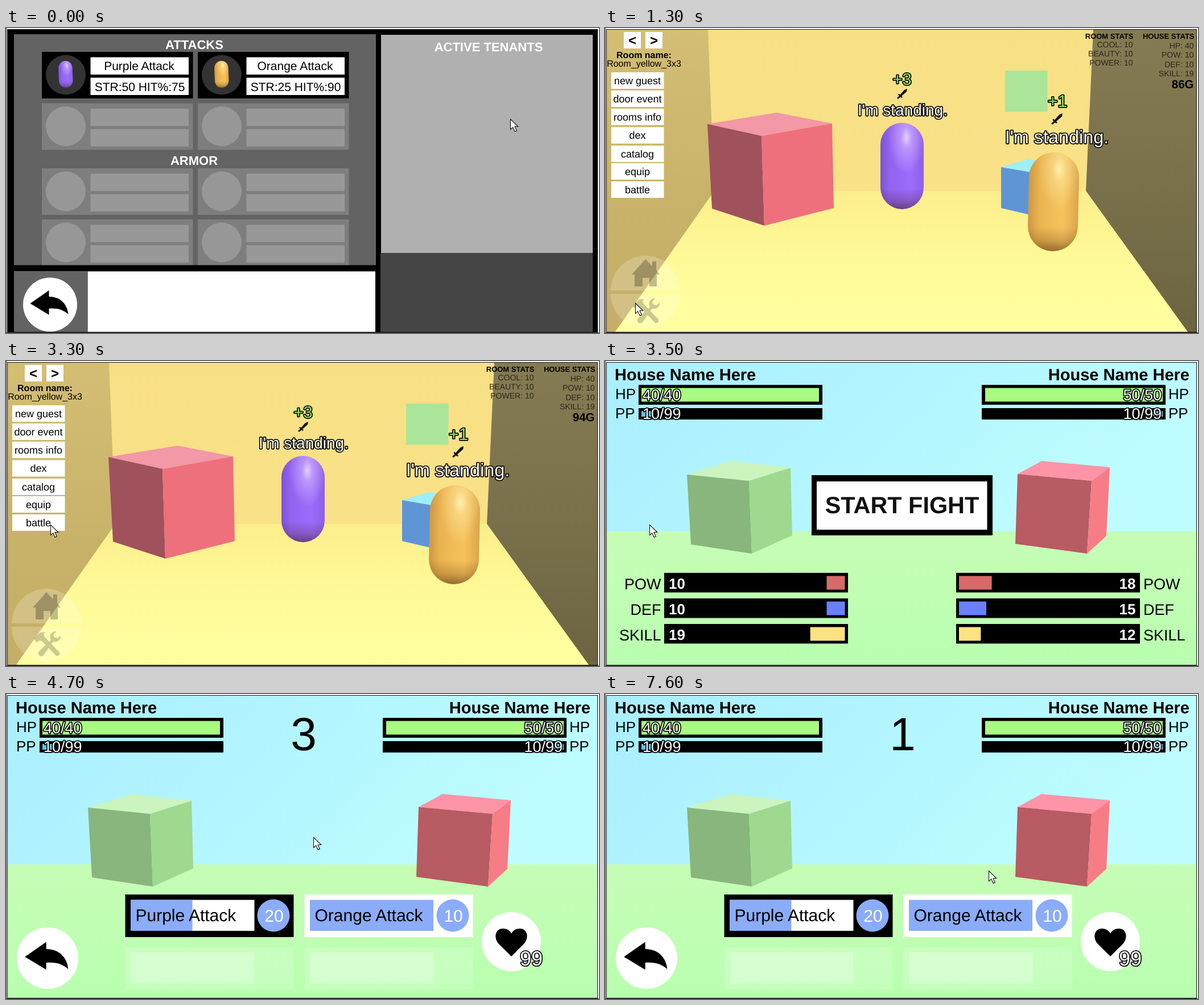
An HTML page that plays this animation: 1042 px wide and 537 px high, repeating every 8000 ms.

```html
<!DOCTYPE html>
<html lang="en">
<head>
<meta charset="utf-8">
<title>Room, equip and battle</title>
<style>
  html, body { margin: 0; width: 100%; height: 100%; overflow: hidden; background: #fff; }
  svg { display: block; width: 100vw; height: 100vh; }
  text { font-family: "Liberation Sans", Arial, sans-serif; text-rendering: geometricPrecision; }
  .b { font-weight: bold; }
  .o { fill: #fff; stroke: #000; stroke-width: 3.4; stroke-linejoin: round; paint-order: stroke; }
  .plus { fill: #8be565; }
  .m { text-anchor: middle; }
  .e { text-anchor: end; }
</style>
</head>
<body>
<svg id="stage" viewBox="0 0 1042 537"></svg>
<script>
const LOOP = 8000;
const BLUE = '#8aacf9';

// Shapes are given by their edges: left, top, right, bottom.
const rect = (l, t, r, b, fill, extra = '') =>
  `<rect x="${l}" y="${t}" width="${r - l}" height="${b - t}" fill="${fill}" ${extra}/>`;
const circ = (x, y, r, fill, extra = '') => `<circle cx="${x}" cy="${y}" r="${r}" fill="${fill}" ${extra}/>`;
const poly = (points, fill) => `<polygon points="${points}" fill="${fill}"/>`;
const path = (d, fill, extra = '') => `<path d="${d}" fill="${fill}" ${extra}/>`;
const text = (x, y, size, str, cls = '', fill = '') =>
  `<text x="${x}" y="${y}" font-size="${size}" class="${cls}" ${fill && `fill="${fill}"`}>${str}</text>`;
const group = (id, body, extra = '') => `<g id="${id}" ${extra}>${body}</g>`;
const gradient = (id, dir, stops) => {
  const [x2, y2] = dir;
  return `<linearGradient id="${id}" x2="${x2}" y2="${y2}">` +
    stops.map(([at, c, a = 1]) => `<stop offset="${at}" stop-color="${c}" stop-opacity="${a}"/>`).join('') +
    '</linearGradient>';
};
const glow = (id, color) =>
  `<radialGradient id="${id}" cx=".6" cy=".17" r=".42"><stop offset="0" stop-color="${color}"/>` +
  `<stop offset=".3" stop-color="${color}" stop-opacity=".45"/><stop offset="1" stop-color="${color}" stop-opacity="0"/></radialGradient>`;

const defs = '<defs>' +
  gradient('purple', [1, 0], [[0, '#7c52d8'], [.2, '#9263ee'], [.7, '#9c6cfb'], [1, '#8d60e6']]) +
  gradient('orange', [1, 0], [[0, '#cf9844'], [.22, '#eab350'], [.7, '#f7c25c'], [1, '#dca54c']]) +
  gradient('shade', [0, 1], [[.76, '#301500', 0], [.9, '#301500', .2], [1, '#301500', .48]]) +
  glow('purpleGlow', '#e6ccff') + glow('orangeGlow', '#fff0ae') +
  gradient('back', [0, 1], [[0, '#f7df84'], [1, '#fbe48a']]) +
  gradient('leftWall', [0, 1], [[0, '#d3be74'], [.6, '#c8b269'], [1, '#c5af66']]) +
  gradient('rightWall', [0, 1], [[0, '#857b53'], [.5, '#7a714c'], [1, '#6c6441']]) +
  gradient('floor', [0, 1], [[0, '#fcee8c'], [.5, '#fffa98'], [1, '#ffffa0']]) +
  gradient('sky', [1, .3], [[0, '#a9eeff'], [1, '#bdfdff']]) +
  gradient('ground', [0, 1], [[0, '#c6fdb6'], [1, '#b9ffb0']]) +
  '</defs>';

const capsule = (name, cx, cy, w, h, tilt) => {
  const layer = fill => rect(cx - w / 2, cy - h / 2, cx + w / 2, cy + h / 2, `url(#${fill})`, `rx="${w / 2}"`);
  return `<g transform="rotate(${tilt} ${cx} ${cy})">${[name, 'shade', name + 'Glow'].map(layer).join('')}</g>`;
};

const backButton = (x, y, r) =>
  `<g transform="translate(${x} ${y}) scale(${r / 47.5})">` + circ(0, 0, 47.5, '#fff') +
  path('M-35-2L-2-25V-14C17-14 30-2 32 17C23 9 13 6-2 7V18Z', '#000') + '</g>';

// Equip screen
function slot(x, y, item) {
  const box = t => rect(x + 85.5, y + t, x + 258, y + t + 30.5, item ? '#fff' : '#989898');
  let s = rect(x, y, x + 265.5, y + 82, item ? '#000' : '#7e7e7e') +
    circ(x + 42, y + 40.5, 35, item ? '#333' : '#979797') + box(9.5) + box(45.5);
  if (item) {
    s += text(x + 171, y + 32, 21, item.name, 'm') + text(x + 172, y + 68.5, 21, item.stats, 'm') +
      capsule(item.color, x + 41.8, y + 39.5, 24.5, 47, -2);
  }
  return s;
}

function equipScreen() {
  const items = [
    { name: 'Purple Attack', stats: 'STR:50 HIT%:75', color: 'purple' },
    { name: 'Orange Attack', stats: 'STR:25 HIT%:90', color: 'orange' },
  ];
  const rows = [42, 132.5, 247, 337].map((y, i) =>
    [63, 337].map((x, j) => slot(x, y, i === 0 && items[j])).join('')).join('');
  return rect(2, 2, 1039, 535.5, '#000') + rect(14, 11, 650, 418, '#636363') + rows +
    rect(14, 417.5, 650, 428, '#000') +
    text(331, 36.5, 22, 'ATTACKS', 'b m', '#fff') + text(330.5, 241, 22, 'ARMOR', 'b m', '#fff') +
    rect(14, 428, 143, 535, '#636363') + rect(143.5, 428.5, 649, 535, '#fff') + backButton(77.5, 487, 47.5) +
    rect(659, 12, 1031, 396, '#b0b0b0') + rect(658, 396, 1031, 535, '#454545') +
    text(848, 41, 22, 'ACTIVE TENANTS', 'b m', '#fff');
}

// Room screen
const sword = (x, y, k) => `<g transform="translate(${x} ${y}) scale(${k})">` +
  path('M18 0L17 5 8 13 10 15 8 16 6 14.5 2 18 0 16 4 12.5 2 10.5 3.5 9 5.5 10.5 13 2Z', '#111') + '</g>';

function roomScreen() {
  const menu = [['new guest', 78], ['door event', 110], ['rooms info', 142], ['dex', 174.5],
    ['catalog', 207], ['equip', 238], ['battle', 270]];
  const lines = (x, y, step, list) =>
    list.map((s, i) => text(x, y + i * step, 14, s, 'e', '#2c2818')).join('');
  const house = 'M71 407L83 419V411H90V426L96 434H91V455H78V440H66V455H52V434H47Z';
  const wrench = 'M80 479a10 10 0 0 1 8-3l-5 6 2 5 6 1 5-5a10 10 0 0 1-13 11L66 518a5 5 0 0 1-8-7L79 491a10 10 0 0 1 1-12Z';
  const hammer = 'M49 489L60 478 69 477 66 481 69 487 93 512A4 4 0 0 1 87 518L63 493 58 492 54 496Z';
  return rect(2, 2, 1039, 535, 'url(#back)') +
    poly('3,3 181,3 192,288 18,535 3,535', 'url(#leftWall)') +
    poly('858,3 1039,3 1039,535 1023,535 845,287', 'url(#rightWall)') +
    poly('192,287 845,287 1024,535 18,535', 'url(#floor)') +
    poly('180,169 302,149 399,168 275,190', '#f298a6') +
    poly('180,169 275,190 280,348 188,318', '#9f525c') +
    poly('275,190 399,168 402,317 280,348', '#ee707c') +
    rect(703, 75, 777.5, 147.5, '#abe59a') +
    poly('696,245 742,231 800,238 760,256', '#9eeff7') +
    poly('696,245 760,256 760,332 696,317', '#5f95d4') +
    capsule('purple', 522, 243, 76, 152, 0) + capsule('orange', 788, 306, 88, 174, 1.3) +
    sword(513, 107, 1) + sword(784, 150, 1.12) +
    text(523, 153.5, 28, "I'm standing.", 'o m') + text(794, 203, 32.4, "I'm standing.", 'o m') +
    group('gains', text(522, 100, 29, '+3', 'o plus m') + text(795, 139, 30, '+1', 'o plus m')) +
    rect(33, 7, 63, 36, '#fff') + rect(71, 7, 101, 36, '#fff') +
    text(48, 29.5, 24, '&lt;', 'b m') + text(86, 29.5, 24, '&gt;', 'b m') +
    text(68.5, 53, 16, 'Room name:', 'b m') + text(68.5, 68, 16, 'Room_yellow_3x3', 'm') +
    menu.map(([s, y]) => rect(11, y, 103.5, y + 29, '#fff') + text(57, y + 20.5, 18, s, 'm')).join('') +
    path('M10 462A61 61 0 0 1 132 462Z', '#fff', 'opacity=".2"') +
    path('M10 468A61 61 0 0 0 132 468Z', '#fff', 'opacity=".2"') +
    path(house, '#000', 'opacity=".25"') +
    `<g opacity=".2">${path(wrench, '#000')}${path(hammer, '#000')}</g>` +
    text(928.5, 18.5, 13, 'ROOM STATS', 'b e') + text(1035.5, 18.5, 13, 'HOUSE STATS', 'b e') +
    lines(927.5, 33.5, 16.3, ['COOL: 10', 'BEAUTY: 10', 'POWER: 10']) +
    lines(1034.5, 36, 16.3, ['HP: 40', 'POW: 10', 'DEF: 10', 'SKILL: 19']) +
    '<text id="gold" x="1034.5" y="106" font-size="20.5" class="b e"></text>';
}

// Battle screen; side 0 is the left fighter, side 1 the right one.
function fighterHud(side, hp) {
  const mirror = (l, t, r, b, fill) => side ? rect(1044 - r, t, 1044 - l, b, fill) : rect(l, t, r, b, fill);
  const end = side ? 'e' : '';
  const tag = side ? 990 : 18;
  const num = side ? 978 : 66;
  return text(side ? 1027 : 17, 34, 29, 'House Name Here', 'b ' + end) +
    text(tag, 67, 26, 'HP') + text(tag, 101, 26, 'PP') +
    mirror(59, 42, 382, 77, '#000') + mirror(64, 47.5, 376, 71.5, '#a8fb80') +
    mirror(59, 83, 382, 103, '#000') + mirror(64, 88, 81, 98, '#62c3ee') +
    text(num, 69, 27, `${hp}/${hp}`, 'o ' + end) + text(num, 101.5, 27, '10/99', 'o ' + end);
}

function statBar(side, row, name, value, color) {
  const y = 373 + row * 45;
  const w = value * 3.2;
  const left = side ? 617 : 104;
  const fillLeft = side ? 622 : 421.5 - w;
  return text(side ? 946 : 98.5, y + 28.5, 27, name, side ? '' : 'e') +
    rect(left, y, left + 323, y + 34.5, '#000') + rect(fillLeft, y + 5.5, fillLeft + w, y + 29.5, color) +
    text(side ? 932.5 : 112, y + 27.5, 26, value, side ? 'b e' : 'b', '#fff');
}

function attackButton(x, name, cost, frame, charge) {
  return rect(x, 353, x + 296, 428, frame) + rect(x + 9.5, 362.5, x + 227, 417, '#fff') +
    rect(x + 9.5, 362.5, x + 9.5 + 217 * charge, 417, BLUE) + text(x + 18, 400, 30, name) +
    circ(x + 260.5, 390, 28.5, BLUE) + text(x + 261.5, 401, 30, cost, 'm', '#fff') +
    rect(x, 446, x + 296, 520, '#fff', 'opacity=".15"') + rect(x + 9.5, 455, x + 227, 510, '#fff', 'opacity=".25"');
}

function battleScreen() {
  const stats = [['POW', 10, 18, '#d66a68'], ['DEF', 10, 15, '#6b80ff'], ['SKILL', 19, 12, '#fde281']];
  const setup = stats.map(([name, a, b, color], i) =>
    statBar(0, i, name, a, color) + statBar(1, i, name, b, color)).join('') +
    rect(363, 201, 681, 307, '#000') + rect(372, 212, 671.5, 297, '#fff') +
    text(522, 268, 41.4, 'START FIGHT', 'b m', '#111');
  const fight = '<text id="count" x="523" y="99" font-size="82" class="m"></text>' +
    attackButton(209.5, 'Purple Attack', 20, '#000', .5) + attackButton(524.5, 'Orange Attack', 10, '#fff', 1) +
    backButton(73, 465, 54) + circ(888, 436, 52, '#fff') +
    path('M888 462L866 440C856 429 860 413 873 413C881 413 886 417 888 422C890 417 895 413 903 413C916 413 920 429 910 440Z', '#000') +
    text(923, 478, 36, '99', 'o m');
  return rect(2, 2, 1039, 301, 'url(#sky)') + rect(2, 300, 1039, 535, 'url(#ground)') +
    poly('144,200 222,176 326,188 253,211', '#ccf4be') +
    poly('144,200 253,211 258,339 151,323', '#88b67d') +
    poly('253,211 326,188 329,307 258,339', '#9fd88f') +
    poly('725,199 767,176 887,187 855,211', '#fe94a7') +
    poly('725,199 855,211 847,339 721,322', '#b85b62') +
    poly('855,211 887,187 881,308 847,339', '#f67d85') +
    fighterHud(0, 40) + fighterHud(1, 50) + group('setup', setup) + group('fight', fight);
}

document.getElementById('stage').innerHTML = defs + rect(0, 0, 1042, 537, '#fff') +
  group('equip', equipScreen()) + group('room', roomScreen()) + group('battle', battleScreen()) +
  rect(2.5, 2.5, 1039.5, 535.5, 'none', 'stroke="#111"') + rect(0, 0, 1, 537, '#333') + rect(0, 536, 1042, 537, '#333') +
  group('cursor', path('M.5.5V18.5L4.8 14.8 8.2 22.3 11.3 21 8 13.5H13.8Z', '#fff', 'stroke="#111" stroke-width="1.1"'));

const part = {};
for (const id of ['equip', 'room', 'battle', 'setup', 'fight', 'gains', 'gold', 'count', 'cursor'])
  part[id] = document.getElementById(id);

// Pointer path: time in tenths of a second, x, y.
const pointer = [
  [0, 886, 160], [2, 852, 188], [3, 852, 188], [4, 804, 204], [5, 804, 204], [6, 715, 246], [9, 300, 420],
  [11, 70, 482], [12, 53, 484], [20, 53, 484], [25, 66, 390], [29, 80, 299], [33, 78, 288], [36, 78, 288],
  [37, 200, 268], [41, 200, 268], [46, 540, 252], [57, 540, 252], [58, 575, 277], [60, 575, 277],
  [65, 672, 310], [66, 672, 310], [68, 668, 310], [69, 671, 310], [75, 671, 310], [76, 674, 311], [80, 674, 311],
];

function pointerAt(tick) {
  const i = pointer.findIndex(([at]) => at > tick);
  const [t0, x0, y0] = pointer[i - 1];
  const [t1, x1, y1] = pointer[i];
  const k = (tick - t0) / (t1 - t0);
  return [x0 + (x1 - x0) * k, y0 + (y1 - y0) * k].map(Math.round);
}

const show = (el, on) => el.setAttribute('display', on ? 'inline' : 'none');

function draw(ms) {
  const tick = Math.floor(ms / 100);
  show(part.equip, tick < 13);
  show(part.room, tick >= 13 && tick < 35);
  show(part.battle, tick >= 35);
  show(part.setup, tick < 47);
  show(part.fight, tick >= 47);
  // Income arrives once a second and its labels stay for half of it.
  const sinceIncome = tick - 12;
  show(part.gains, sinceIncome % 10 < 5);
  part.gold.textContent = 86 + 4 * Math.floor(sinceIncome / 10) + 'G';
  part.count.textContent = tick < 61 ? 3 : tick < 71 ? 2 : 1;
  part.cursor.setAttribute('transform', `translate(${pointerAt(tick)})`);
}

function loop() {
  draw(performance.now() % LOOP);
  requestAnimationFrame(loop);
}
loop();
</script>
</body>
</html>
```
